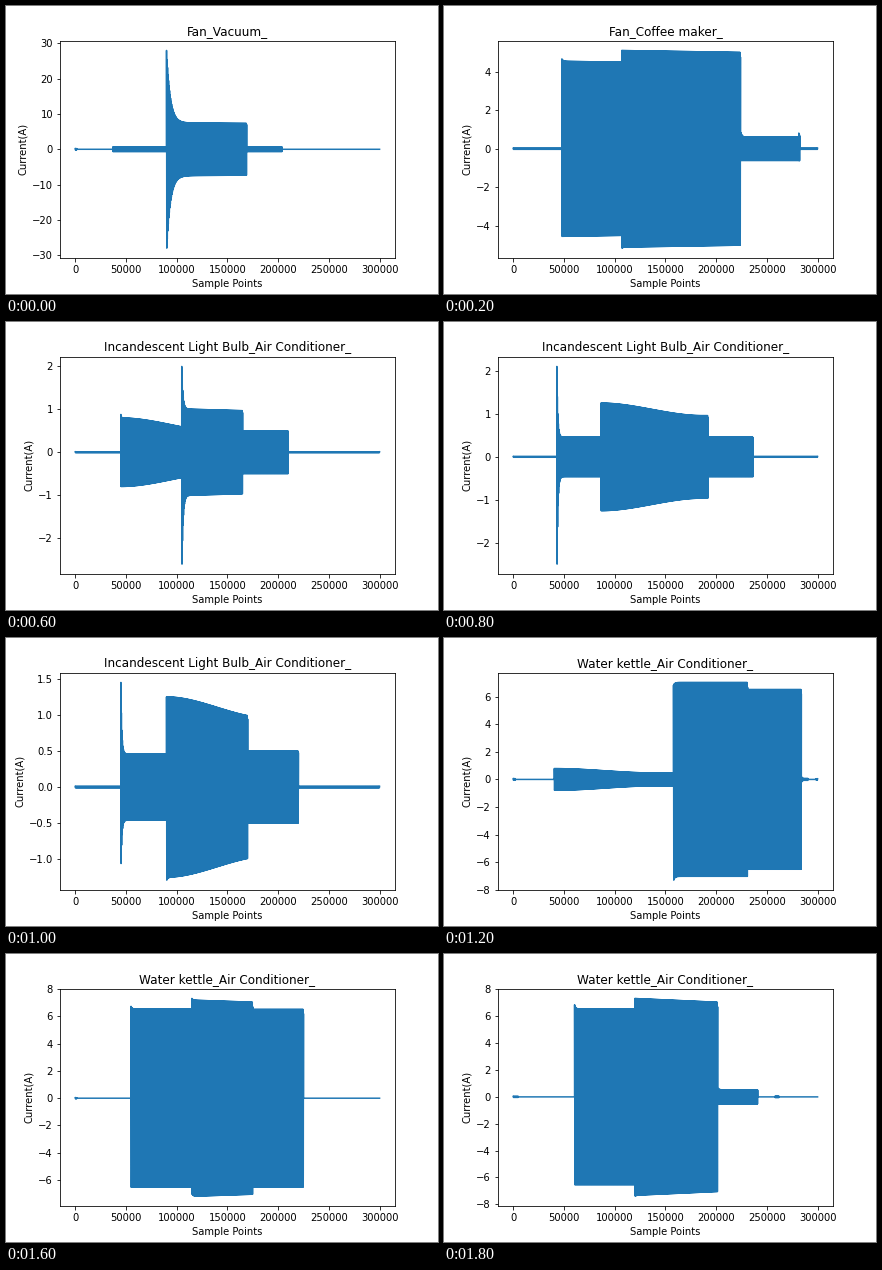
Animation of 432 by 288 pixels, one loop 2000 ms. Source, as a matplotlib script:

```python
import numpy as np
import matplotlib.pyplot as plt
from matplotlib.animation import FuncAnimation

CYCLE = 500        # samples per mains cycle
COOLDOWN = 100000  # samples until the air conditioner settles
X = np.arange(0, 300001, CYCLE // 20)
WAVE = np.cos(2 * np.pi * X / CYCLE)
BULB = "Incandescent Light Bulb_Air Conditioner_"
KETTLE = "Water kettle_Air Conditioner_"


def burst(start, end, a, b=None, up=0, down=0, tau=1200, ease=False):
    """Stretch of current going from amplitude a to b, with an inrush on each side."""
    b = a if b is None else b
    inside = (X >= start) & (X < end)
    t = X[inside] - start
    u = t / (end - start)
    if ease:
        u = np.minimum(t / COOLDOWN, 1)
        u = u * u * (3 - 2 * u)
    level = a + (b - a) * u
    # the lower side starts to decay at its first crest, half a cycle later
    late = np.maximum(t - CYCLE / 2, 0)
    high = level + up * np.exp(-t / tau)
    low = level + down * np.exp(-late / tau)
    return inside, high, low


# title, idle amplitude, bursts
SCENES = [
    ("Fan_Vacuum_", 0, [
        burst(0, 1500, 0.2),
        burst(37000, 90000, 0.65),
        burst(90000, 169000, 7.5, 7.35, up=20.5, down=20.5, tau=3700),
        burst(169000, 204000, 0.65),
    ]),
    ("Fan_Coffee maker_", 0.03, [
        burst(48000, 107000, 4.56, 4.51, up=0.12),
        burst(107000, 224000, 5.12, 5.02, down=0.05),
        burst(224000, 281500, 0.61, up=0.35),
        burst(281500, 282500, 0.62, up=0.2),
    ]),
    (BULB, 0.01, [
        burst(35500, 102000, 0.8, 0.48, up=0.08, tau=500, ease=True),
        burst(102000, 157000, 1.01, 0.97, up=1.98, down=0.94),
        burst(157000, 182000, 0.46),
    ]),
    (BULB, 0.01, [
        burst(45000, 105000, 0.8, 0.48, up=0.08, tau=500, ease=True),
        burst(105000, 165000, 1.01, 0.97, up=0.99, down=1.6),
        burst(165000, 210000, 0.5),
    ]),
    (BULB, 0.01, [
        burst(43000, 86500, 0.46, up=1.64, down=2.03, tau=900),
        burst(86500, 192000, 1.25, 0.96, ease=True),
        burst(192000, 236500, 0.46),
    ]),
    (BULB, 0.01, [
        burst(45000, 90000, 0.46, up=0.99, down=0.6, tau=900),
        burst(90000, 170000, 1.25, 0.96, down=0.04, ease=True),
        burst(170000, 220000, 0.5),
    ]),
    (KETTLE, 0, [
        burst(0, 2000, 0.06),
        burst(40500, 158000, 0.79, 0.47, ease=True),
        burst(158000, 231000, 7.03, up=-0.2, down=0.27),
        burst(231000, 284000, 6.52),
        burst(284000, 286000, 0.2, 0.06),
        burst(286000, 290500, 0.07),
        burst(298500, 300001, 0.05),
    ]),
    (KETTLE, 0, [
        burst(0, 1500, 0.04),
        burst(50000, 116500, 0.8, 0.48, ease=True),
        burst(116500, 183500, 7.02, up=0.3, down=-0.12),
        burst(183500, 226500, 0.52, up=-0.15, down=-0.1),
        burst(226500, 240000, 0.05, 0.02),
    ]),
    (KETTLE, 0, [
        burst(0, 1500, 0.04),
        burst(55000, 115000, 6.54, up=0.2),
        burst(115000, 175000, 7.2, 7.05, up=0.12, down=-0.15),
        burst(175000, 225000, 6.52),
    ]),
    (KETTLE, 0, [
        burst(0, 5000, 0.04),
        burst(60500, 120000, 6.54, up=0.32),
        burst(120000, 201500, 7.33, 7.05, down=0.06),
        burst(201500, 241000, 0.53, up=0.15),
        burst(258000, 262000, 0.05),
    ]),
]

fig, ax = plt.subplots(figsize=(6, 4), dpi=72)
fig.subplots_adjust(left=0.125, right=0.9, bottom=0.125, top=0.88)


def draw(i):
    title, idle, bursts = SCENES[i]
    high = np.full(X.size, float(idle))
    low = high.copy()
    for inside, above, below in bursts:
        high[inside] = above
        low[inside] = below
    ax.clear()
    ax.plot(X, WAVE * np.where(WAVE > 0, high, low), color="#1f77b4", lw=1.5)
    ax.set_title(title)
    ax.set_xlabel("Sample Points")
    ax.set_ylabel("Current(A)")
    return []


anim = FuncAnimation(fig, draw, frames=len(SCENES), init_func=lambda: [],
                     interval=200, repeat=True, repeat_delay=0)
plt.show()
```
